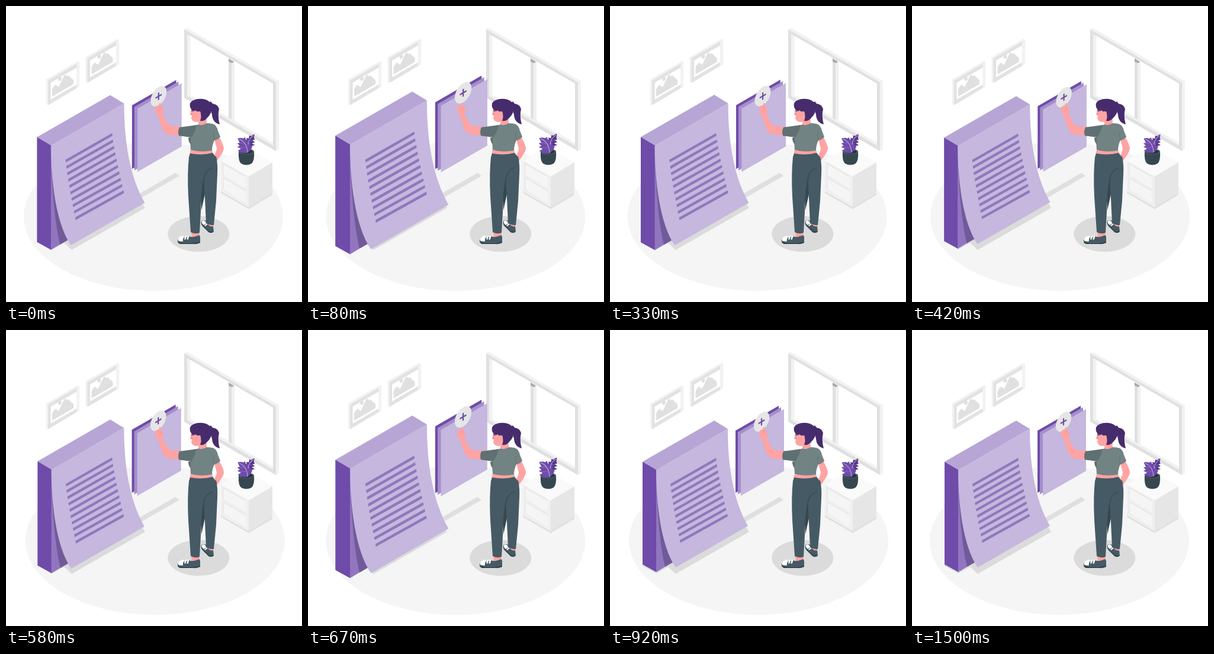
Write an HTML page that moves like this. It is 500 by 500 pixels and loops after 1.54 s.

```html
<!DOCTYPE html>
<html lang="en">
<head>
<meta charset="utf-8">
<title>Adding a page</title>
<style>
  html, body { margin: 0; width: 100%; height: 100%; overflow: hidden; background: #fff; }
  svg { display: block; width: 100vw; height: 100vh; }
  .skin { fill: #ffa3a3; }
  .hair { fill: #472c6d; }
  .slate { fill: #455a64; }
  .dark { fill: #37474f; }
  .violet { fill: #6f4baa; }
  .page { fill: #c5b7de; }
</style>
</head>
<body>
<svg viewBox="0 0 500 500">
  <defs>
    <g id="frame">
      <path fill="#f2f2f2" d="M68 124 121.500 93 124 94.500V136L71 167.500 68 166Z"/>
      <path fill="#e2e2e2" d="M71 126 124 95V136L71 167.500Z"/>
      <path fill="#f2f2f2" d="M119.500 97.500 124 95V136L119.500 139Z"/>
      <path fill="#fff" d="M75.500 129.500 119.500 104V132.500L75.500 158Z"/>
      <path fill="#e0e0e0" d="M78 153V141Q83 131 85 134L89 137 98 118Q100 114 103 119 105 115 108 120L114 125V132Z"/>
      <ellipse cx="91" cy="123" rx="2.800" ry="3.500" fill="#e0e0e0" transform="rotate(25 91 123)"/>
    </g>
  </defs>

  <ellipse id="floor" cx="249" cy="355.700" rx="219" ry="125.500" fill="#f5f5f5"/>

  <use href="#frame"/>
  <use href="#frame" x="66.500" y="-37.500"/>

  <g id="window">
    <path fill="#f2f2f2" d="M301 39 305.500 37 461 127V242L456 245 301 155Z"/>
    <path fill="#e0e0e0" d="M301 39.500 456 129V245L301 155Z"/>
    <path fill="#f2f2f2" d="M306 47.500 451 131V236L306 152Z"/>
    <path fill="#fff" d="M311.500 50.500 451 131V231L311.500 150.500Z"/>
    <path fill="#e0e0e0" d="M376 88 381 91V192L376 189Z"/>
    <path fill="#f0f0f0" d="M381 91 386 94V194.500L381 192Z"/>
    <path fill="#a9a9a9" d="M376 89 385 94 382 96.500 376 94Z"/>
  </g>

  <g id="cabinet">
    <path fill="#e0e0e0" d="M363 311 410 338 450 314V319L410 343 363 316Z"/>
    <path fill="#fafafa" d="M363 261 403 237 450 264 410 288Z"/>
    <path fill="#f0f0f0" d="M363 261 410 288V340L363 313Z"/>
    <path fill="#e6e6e6" d="M410 288 450 264V316L410 340Z"/>
    <path fill="#e6e6e6" d="M366 265 405 287V308L366 286ZM366 289 405 311V333L366 310Z"/>
    <path fill="#f5f5f5" d="M367.500 267.500 405 289V308L367.500 286ZM367.500 291.500 405 313V333L367.500 310Z"/>
  </g>

  <path class="dark" d="M393 246Q392 262 397 266 406 271 415 266 420 261 419 246Z"/>
  <ellipse class="slate" cx="406" cy="246" rx="13" ry="5"/>
  <ellipse cx="406" cy="246" rx="10.500" ry="3.700" fill="#263238"/>
  <g id="leaves">
    <path fill="#56368a" d="M404 246Q401 237 405 231L403 229 407 227 406 223 410 224 411 219 414 220Q417 217 419.500 217L418.500 223 420 226 416 227 420 230 415 232 420 235 412 237Q411 242 407 244Z"/>
    <path class="violet" d="M408 248Q397 249 392 244L397 241 391 238 395 236 391 232 395 231 391.500 224Q396 222 401 224L404 222 405 226 409 226 409 230 413 231 412 235 416 237 414 242Z"/>
    <path fill="none" stroke="#c5b7de" stroke-width="1" d="M394 225Q407 230 408 247M418 219Q409 225 409 234"/>
    <path fill="none" stroke="#9a7fc8" stroke-width=".6" d="M394 232 404 232M394 239 407 239M411 228H416"/>
  </g>

  <path fill="#dbdbdb" d="M53 397 78 411 98 400 111 412 235 341 225 325 100 390Z"/>
  <path fill="#dfdfdf" d="M215 323 286 282 293 287 220 329Z"/>

  <g id="book">
    <path class="violet" d="M212 170 285 128V233L212 275Z"/>
    <path fill="#a48fca" d="M216 172.500 289 130.500V235.500L216 277.500Z"/>
    <path class="page" d="M221 175.500 294 133.500V238L221 280Z"/>
    <path fill="#b7a6d5" d="M55 222.500 176 153 199 167 78 237Z"/>
    <path class="violet" d="M55 222.500 78.500 236.500V409L55 396Z"/>
    <path fill="#9176bf" d="M78 237 106 392 78 409Z"/>
    <path fill="#725a9a" d="M79 275Q83 360 93 400L107 392Z"/>
    <path class="page" d="M78 237 199 167C199 230 208 287 233 331L111 401C86 365 78 293 78 237Z"/>
    <path id="lines" fill="#8f78bb"/>
    <g transform="matrix(.866 -.5 0 1 256 155)">
      <circle r="15.200" fill="#e6e6e6"/>
      <path fill="none" stroke="#6f4baa" stroke-width="2.500" d="M-6 0H6M0-6V6"/>
    </g>
  </g>

  <ellipse cx="325.300" cy="385" rx="52" ry="30.300" fill="#dbdbdb"/>
  <g id="woman">
    <path class="skin" d="M352 225 360 221Q368 235 368 241 367 248 356 262L349 258Q355 248 356 241Z"/>
    <path class="skin" d="M340 366H350V375L341 374ZM313 381H326.500V391L314 392Z"/>
    <path class="slate" d="M337 362 341 369Q346 374 350 372L351 381Q347 385 342 381L330 369Q328 363 332 362Z"/>
    <path fill="#fff" d="M330.500 363.500Q333 361.500 336 363L338.500 367 334 370Q330 367 330.500 363.500ZM339 367 340.500 369 336.500 372 335 371Z"/>
    <path class="dark" d="M330 368 343 380 351 381Q347 385 342 382L331 371Z"/>
    <path class="slate" d="M309 389Q315 392 326.500 387L328 390V400Q322 403 317 402H294Q289 400 290 395Z"/>
    <path fill="#fff" d="M291 393Q294 388 300 388L298.500 398 291 397ZM303 388 305.500 388 303 395 301 394ZM307 388 309.500 389 307.500 395 305 394Z"/>
    <path fill="none" stroke="#263238" stroke-width="1.200" d="M290.500 398.500Q293 401.500 299 401.500H316L328 399"/>
    <path class="skin" d="M312 242H348L350 252H310Z"/>
    <path class="dark" d="M330 260H355L340 300 330 345Z"/>
    <path class="slate" d="M333 260 355 254Q358 268 357 284L355 329 351 370Q344 371 338 367L336 325Q334 290 333 260Z"/>
    <path class="slate" d="M311 249Q331 253 349 248L355 256Q359 270 349 274 339 277 336 288 331 306 330 330L327 383Q320 386 312 382L308 322Q306 282 309 255Z"/>
    <path fill="none" stroke="#37474f" stroke-width="1.300" d="M349 273Q338 277 335 288 331 306 330 331"/>

    <path class="skin" d="M296 204 278 203Q273 200 269 192L264 181Q267 178 266 174L264 171Q261 171 262 165 259 162 258 168 252 168 252 174 251 180 256 184L263 204Q267 215 274 217L296 219Z"/>
    <path fill="none" stroke="#f08a8c" stroke-width=".7" d="M257 169 262 172 260 176"/>
    <path fill="#728384" d="M322 201Q335 196 349 199 356 201 358 211L362 221Q358 226 352 227 348 235 348 244 329 248 312 243 311 232 311 221L292 219Q290 211 293 205L308 204Z"/>
    <path fill="#5f7072" d="M293 205 322 201Q319 214 313 222L292 219Q290 211 293 205ZM308 223Q308 229 312 234L312 220Z"/>
    <path fill="none" stroke="#607173" stroke-width=".9" d="M352 227Q349 219 351 212"/>

    <path class="skin" d="M325 184H338L339 198Q331 203 325 200Z"/>
    <path class="skin" d="M314 168Q312 178 311 184L314 185 313 189Q314 196 322 196 331 195 334 187L333 168Z"/>
    <path class="hair" d="M311 171Q309 162 317 159 326 155 337 158 344 160 348 168 349 181 339 190 335 195 328 194 331 187 328 178 323 180 320 176Q318 179 314 176Z"/>
    <path class="hair" d="M344 163 346 161 349 165Q358 166 360 174 357 185 361 200 349 197 348 184L346 175Z"/>
    <ellipse class="skin" cx="325" cy="183" rx="4" ry="5" transform="rotate(20 325 183)"/>
    <path fill="none" stroke="#472c6d" stroke-width="1" d="M313 177 316 178M314 182V183"/>
  </g>
</svg>
<script>
const LOOP = 1540, FPS = 24;
const $ = id => document.getElementById(id);

// Text lines follow the curl of the page.
let text = '';
for (let i = 0; i < 10; i++) {
  const u = i / 9, left = 102 + 16 * u ** 1.2, right = 179 + 19 * u ** 1.2;
  const y1 = 260 + 95 * u, y2 = 216 + 94.5 * u;
  text += `M${left} ${y1}L${right} ${y2}l.8 4.400L${left + .8} ${y1 + 4.4}Z`;
}
$('lines').setAttribute('d', text);

const beat = [[0, .22], [124, 1], [210, .69], [330, .26], [450, 0], [563, 0],
  [700, .97], [750, .77], [915, 0], [LOOP, 0]];
const sway = [[0, 0], [210, 1], [330, -.5], [460, 2], [575, 3], [750, -2],
  [915, 2], [1495, 2], [1500, 0], [LOOP, 0]];

function at(keys, t) {
  const i = Math.max(1, keys.findIndex(k => k[0] >= t));
  const [t0, a] = keys[i - 1], [t1, b] = keys[i];
  return a + (b - a) * (t - t0) / (t1 - t0);
}

function scale(id, x, y, s) {
  $(id).setAttribute('transform', `translate(${x} ${y}) scale(${s}) translate(${-x} ${-y})`);
}

function draw(now) {
  const step = Math.floor(now % LOOP * FPS / 1000 + .1);
  const t = Math.min(step * 1000 / FPS, LOOP);
  const s = 1 + .1 * at(beat, t);
  scale('book', 174, 268, s);
  scale('leaves', 406, 234, s);
  $('floor').setAttribute('transform', `translate(${at(sway, t)} 0)`);
}

function tick() {
  draw(performance.now());
  requestAnimationFrame(tick);
}
tick();
</script>
</body>
</html>
```
